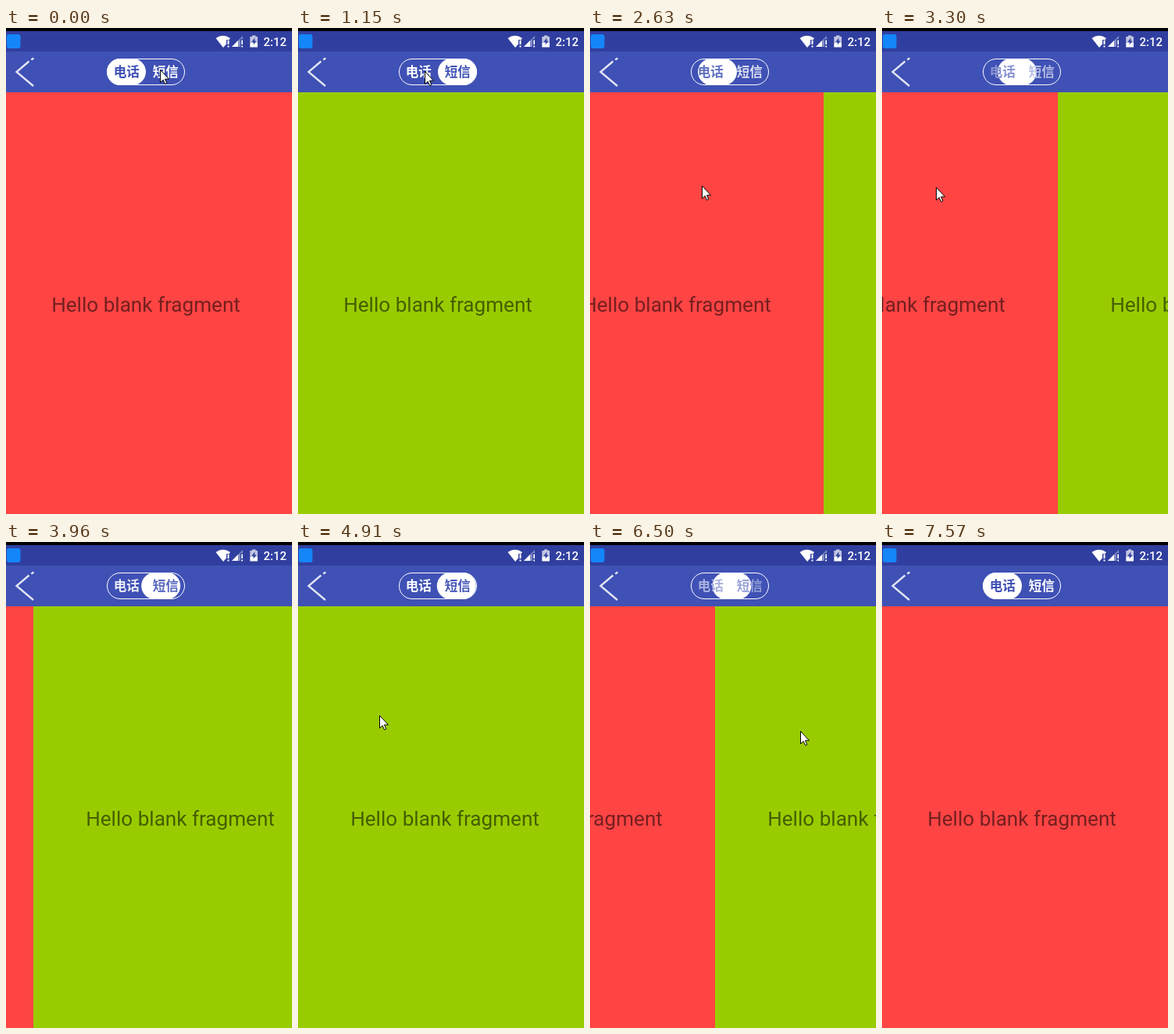
These frames come from a looping animation (366x620 px, 8840 ms). An HTML page:

```html
<!DOCTYPE html>
<html lang="zh-CN">
<head>
<meta charset="utf-8">
<title>Pager tabs</title>
<style>
  html, body { margin: 0; width: 100%; height: 100%; overflow: hidden; background: #000; }
  svg { display: block; width: 366px; height: 620px; }
  text { text-anchor: middle; }
  .hello { font: 400 26.1px Roboto, sans-serif; fill: #000; fill-opacity: .54; }
  .tab { font: 600 16.6px "Noto Sans CJK SC", "Noto Sans CJK JP", "Noto Sans CJK", sans-serif; }
  .clock { font: 500 15px Roboto, sans-serif; fill: #fff; }
</style>
</head>
<body>
<svg viewBox="0 0 366 620">
  <g id="red">
    <rect x="-9" y="82" width="376" height="538" fill="#f44"/>
    <text class="hello" x="179" y="362">Hello blank fragment</text>
  </g>
  <g id="green">
    <rect x="-9" y="82" width="376" height="538" fill="#9c0"/>
    <text class="hello" x="179" y="362">Hello blank fragment</text>
  </g>

  <rect width="366" height="4"/>
  <rect y="4" width="366" height="26" fill="#303f9f"/>
  <rect y="30" width="366" height="52" fill="#3f51b5"/>

  <!-- status bar -->
  <rect x="1" y="8" width="17.5" height="18" rx="3" fill="#1486fa"/>
  <g fill="#fff">
    <path d="M268.5 13Q277.5 6.5 287 13L285.5 15H282V20.5L278 25Z"/>
    <path d="M283.5 15.500h2v5.500h-2zM283.500 22.500h2v2h-2z"/>
    <path d="M303 10V14H300V24H289Z" fill-opacity=".4"/>
    <path d="M297 16V24H289Z"/>
    <path d="M301.3 15.500h1.700v5.500h-1.700zM301.300 22.500h1.700v2h-1.700z"/>
    <path d="M315 9.500h4.500v1.500h2.500v8h-9.700v-8H315Z" fill-opacity=".7"/>
    <path d="M312.300 19h9.700v5.500h-9.700z"/>
  </g>
  <path d="M318.300 12.500L314.300 18H316.700V21.500L320.500 16.500H318.300Z" fill="#303f9f"/>
  <text class="clock" x="344.300" y="22.700">2:12</text>

  <!-- back arrow -->
  <path d="M29.500 42.500L13.500 56L35 74M32.300 40.500L35.500 38.500" fill="none" stroke="#e4e6f5" stroke-width="2.300"/>

  <!-- tab switch -->
  <rect x="129.500" y="39.500" width="99" height="33" rx="16.500" fill="none" stroke="#fff"/>
  <rect id="thumb" x="129" y="39" width="50" height="34" rx="17" fill="#fff"/>
  <text id="call" class="tab" x="154.300" y="62">电话</text>
  <text id="sms" class="tab" x="204.300" y="62">短信</text>

  <path id="cursor" d="M.5 .5V16.500L4.200 13.200L6.500 18.500L8.800 17.500L6.500 12.200H11.500Z"
    fill="#fff" stroke="#000" stroke-linejoin="round"/>
</svg>
<script>
const LOOP = 8840, STEP = 136.5, PAGE = 376;
const get = id => document.getElementById(id);
const [red, green, thumb, call, sms, cursor] =
  ['red', 'green', 'thumb', 'call', 'sms', 'cursor'].map(get);

const drag = u => u;
const snap = u => 1 - (1 - u) ** 5;

// All times below are in screen updates of STEP ms.
// Page 0 is red, page 1 is green.
const moves = [
  { from: 2.6, to: 4, page: 1, ease: snap },
  { from: 9.6, to: 11, page: 0, ease: snap },
  { from: 14.4, to: 28.65, page: .561, ease: drag },
  { from: 28.65, to: 30.15, page: 1, ease: snap },
  { from: 34.3, to: 54, page: .302, ease: drag },
  { from: 54, to: 55, page: 0, ease: snap }
];

// time, x, y: tap, tap, drag out on the left, drag out on the right
const stops = [
  [0, 197, 53], [1, 208, 56], [3, 208, 56], [8, 162, 55], [10, 162, 55],
  [14.4, 211, 198], [28.65, 0, 206], [30, -60, 210],
  [33, 94, 220], [34.3, 94, 220], [55, 379, 254]
];

const part = (n, a, b) => Math.min(1, Math.max(0, (n - a) / (b - a)));
const mix = (a, b, u) => a + (b - a) * u;

const pageAt = n => moves.reduce(
  (p, m) => mix(p, m.page, m.ease(part(n, m.from, m.to))), 0);

function pointerAt(n) {
  const i = Math.max(1, stops.findIndex(s => s[0] > n));
  const a = stops[i - 1], b = stops[i], u = part(n, a[0], b[0]);
  return [1, 2].map(k => Math.round(mix(a[k], b[k], u)));
}

const tint = u => `rgb(${[63, 81, 181].map(c => Math.round(mix(c, 255, u)))})`;
const move = (el, x, y = 0) => el.setAttribute('transform', `translate(${x} ${y})`);

function draw(time) {
  const n = Math.floor(time % LOOP / STEP);
  const p = pageAt(n), shift = Math.round(PAGE * p);
  move(red, -shift);
  move(green, PAGE - shift);
  move(thumb, 50 * p);
  call.setAttribute('fill', tint(p));
  sms.setAttribute('fill', tint(1 - p));
  cursor.style.display = n < stops[stops.length - 1][0] ? '' : 'none';
  move(cursor, ...pointerAt(n));
}

const start = performance.now();
function frame() {
  draw(performance.now() - start);
  requestAnimationFrame(frame);
}
frame();
</script>
</body>
</html>
```
